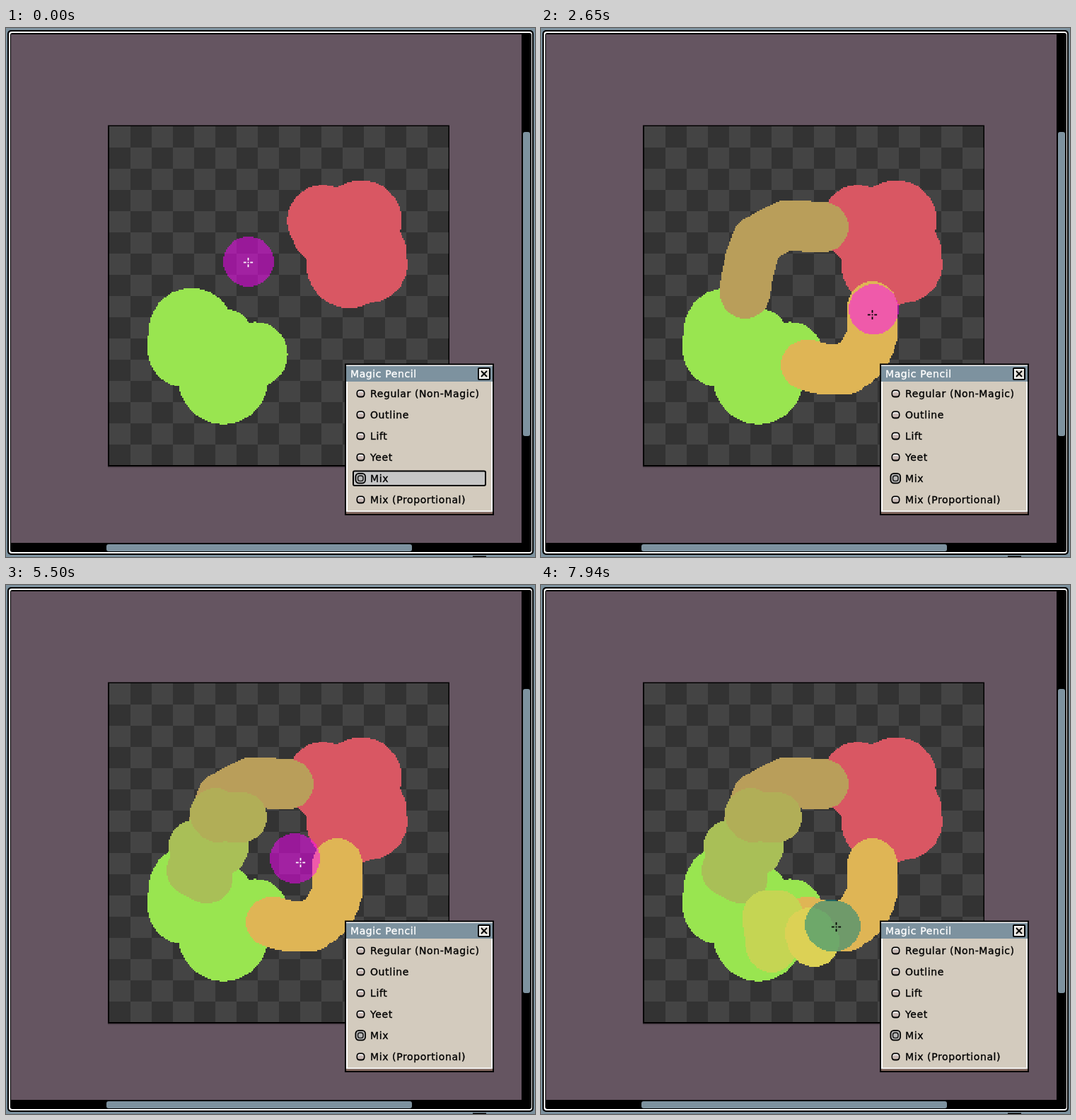
Recreate the animation shown at these times as an HTML page with a canvas. Size 748x748 px, loop 8000 ms.

```html
<!DOCTYPE html>
<html lang="en">
<head>
<meta charset="utf-8">
<title>Magic Pencil</title>
<style>
html, body { margin: 0; width: 100%; height: 100%; overflow: hidden; background: #655561; }
canvas { display: block; }
</style>
</head>
<body>
<canvas id="stage" width="748" height="748"></canvas>
<script>
const LOOP = 8000, PX = 1.875, LEFT = 146, TOP = 139, SPRITE = 256, BRUSH = 35.6, SETTLE = 45;
const STEEL = '#7d929f', PAPER = '#d3cbbe', MAGENTA = '#ff00ff', TEAL = '#008080';
const ctx = document.getElementById('stage').getContext('2d', { willReadFrequently: true });

// Brush centre over time: ms, x, y
const path = [
  [0, 342, 331], [140, 342, 331], [400, 390, 285], [560, 400, 282], [760, 347, 279],
  [830, 305, 301], [970, 296, 330], [1080, 290, 359], [1200, 288, 376], [1600, 345, 485],
  [1800, 374, 476], [1980, 400, 482], [2130, 432, 482], [2300, 457, 463], [2430, 468, 436],
  [2600, 468, 394], [2650, 470, 397], [2900, 450, 475], [3050, 390, 494], [3430, 268, 425],
  [3610, 258, 401], [3850, 285, 415], [4130, 266, 368], [4400, 306, 376], [4600, 309, 341],
  [4720, 292, 341], [4880, 296, 323], [5000, 300, 329], [5240, 334, 328], [5740, 478, 440],
  [5920, 443, 513], [5980, 426, 541], [6280, 331, 497], [6480, 331, 497], [6620, 326, 512],
  [6880, 320, 467], [6980, 336, 467], [7270, 380, 492], [7430, 386, 504], [7700, 408, 480],
  [7940, 416, 483], [8000, 419, 483]
];

// Button down, button up, mixed colour, preview tint
const strokes = [
  [560, 1200, '#b99e5a', MAGENTA],
  [1800, 2600, '#dfb555', MAGENTA],
  [3640, 4130, '#a9bf57', MAGENTA],
  [4330, 4600, '#a9bf57', MAGENTA],
  [4880, 5000, '#b1ae57', MAGENTA],
  [5140, 5240, '#b1ae57', MAGENTA],
  [6530, 6980, '#c5d553', MAGENTA],
  [7270, 7430, '#dcd155', MAGENTA],
  [7700, LOOP, '#6b9d6b', TEAL]
].map(([down, up, color, tint]) => ({ down, up, color, tint, commit: up + SETTLE }));

const redBlob = [[447, 273, 50], [453, 285, 50], [503, 272, 57], [518, 318, 49], [513, 334, 54], [485, 335, 60]];
const greenBlob = [[262, 427, 60], [252, 442, 52], [252, 455, 52], [307, 497, 63], [310, 438, 40], [352, 462, 46]];

function brushAt(t) {
  t = Math.min(t, LOOP);
  const i = Math.max(1, path.findIndex(k => k[0] >= t));
  const [t0, x0, y0] = path[i - 1], [t1, x1, y1] = path[i];
  const u = (t - t0) / (t1 - t0);
  return [x0 + (x1 - x0) * u, y0 + (y1 - y0) * u];
}

function makeLayer() {
  const c = document.createElement('canvas');
  c.width = c.height = SPRITE;
  return c.getContext('2d');
}

// Hard-edged disc on the sprite's own pixel grid
function disc(g, x, y, radius = BRUSH) {
  const cx = Math.round((x - LEFT) / PX), cy = Math.round((y - TOP) / PX), r = radius / PX;
  for (let dy = -Math.round(r); dy < Math.round(r); dy++) {
    const half = Math.round(Math.sqrt(Math.max(0, r * r - (dy + .5) ** 2)));
    g.fillRect(cx - half, cy + dy, half * 2, 1);
  }
}

function dabs(g, from, to) {
  for (let t = from; t < to; t += 6) disc(g, ...brushAt(t));
  disc(g, ...brushAt(to));
}

function showLayer(g, alpha = 1) {
  ctx.globalAlpha = alpha;
  ctx.drawImage(g.canvas, LEFT, TOP, SPRITE * PX, SPRITE * PX);
  ctx.globalAlpha = 1;
}

const base = makeLayer(), preview = makeLayer();
for (const [color, blob] of [['#d95763', redBlob], ['#99e550', greenBlob]]) {
  base.fillStyle = color;
  blob.forEach(d => disc(base, ...d));
}
for (const s of strokes) {
  s.layer = makeLayer();
  s.layer.fillStyle = s.color;
  dabs(s.layer, s.down, s.up);
}

function rect(color, x, y, w, h) {
  ctx.fillStyle = color;
  ctx.fillRect(x, y, w, h);
}

function round(color, x, y, w, h, r) {
  ctx.fillStyle = color;
  ctx.beginPath();
  ctx.roundRect(x, y, w, h, r);
  ctx.fill();
}

function label(text, x, y, color) {
  ctx.font = '14px "DejaVu Sans", sans-serif';
  ctx.letterSpacing = '0.6px';
  ctx.fillStyle = ctx.strokeStyle = color;
  ctx.lineWidth = .35;
  ctx.fillText(text, x, y);
  ctx.strokeText(text, x, y);
}

function drawFrame() {
  rect(STEEL, 0, 0, 748, 748);
  round('#000', 2, 3, 744, 742, 5);
  round('#fff', 4, 5, 740, 738, 4);
  round('#000', 6, 7, 737, 734, 3);
  rect('#655561', 7, 9, 722, 719);
  round(STEEL, 731, 147, 10, 430, 3);
  round(STEEL, 142, 730, 432, 10, 3);
  rect('#000', 660, 746.5, 19, 1.5);
  rect('#4c3f48', 144, 620, 483, 1.5);
  rect('#000', 144, 137.5, 483, 482.5);
  rect('#333', LEFT, TOP, 479.5, 479);
  ctx.fillStyle = '#444';
  for (let i = 0; i < 256; i++) {
    const col = i % 16, row = i >> 4;
    if ((col + row) % 2 === 0) {
      ctx.fillRect(LEFT + col * 30, TOP + row * 30, col < 15 ? 30 : 29.5, row < 15 ? 30 : 29);
    }
  }
}

function drawRadio(y, on) {
  if (on) {
    round('#000', 493.5, y - 8, 15.5, 15.5, 5.5);
    round('#b9b9b9', 495.3, y - 6.2, 12, 12, 4);
    round('#222', 496.8, y - 4.7, 9, 9, 3.5);
    round('#b9b9b9', 498.4, y - 3.1, 5.8, 5.8, 2);
  } else {
    round('#000', 495.5, y - 5.5, 12, 11, 4.5);
    round('#fff', 497.3, y - 3.7, 8.4, 6, 2.5);
    round('#c8b8b3', 497.3, y - 2, 8.4, 5.6, 2.5);
  }
}

function drawDialog(hover) {
  rect('#000', 479, 474.5, 211, 214.5);
  rect('#fff', 481, 476.5, 207, 208);
  rect('#86695f', 481, 684.5, 207, 2.5);
  rect(STEEL, 481, 478, 207, 22);
  rect(PAPER, 483, 500, 203, 182.5);
  label('Magic Pencil', 487, 494, '#fff');
  round('#000', 667, 480, 18, 18, 2);
  rect('#fff', 669, 482, 14, 14);
  rect('#e2ddd5', 670.5, 483.5, 12.5, 11);
  ctx.strokeStyle = '#000';
  ctx.lineWidth = 1.9;
  ctx.beginPath();
  for (const s of [-4, 4]) {
    ctx.moveTo(676 - s, 485);
    ctx.lineTo(676 + s, 493);
  }
  ctx.stroke();
  if (hover) {
    round('#000', 490, 625.5, 189, 22.5, 3);
    round('#c6c6c6', 492, 627.5, 185, 18.5, 1);
  }
  ['Regular (Non-Magic)', 'Outline', 'Lift', 'Yeet', 'Mix', 'Mix (Proportional)'].forEach((text, i) => {
    const y = 517 + i * 30;
    drawRadio(y, text === 'Mix');
    label(text, 515, y + 5, '#000');
  });
}

// Crosshair contrasts with whatever lies below it
function drawCursor(t) {
  const [x, y] = brushAt(t + 25).map(v => Math.round(v) + .5);
  const [r, g, b] = ctx.getImageData(Math.floor(x), Math.floor(y), 1, 1).data;
  const color = r * .3 + g * .59 + b * .11 > 100 ? '#000' : '#fff';
  rect(color, x - .9, y - .9, 1.8, 1.8);
  for (const a of [-6.6, 2.8]) {
    rect(color, x + a, y - .9, 3.8, 1.8);
    rect(color, x - .9, y + a, 1.8, 3.8);
  }
}

function draw(now) {
  const t = now % LOOP;
  ctx.imageSmoothingEnabled = false;
  drawFrame();
  showLayer(base);
  for (const s of strokes) if (t >= s.commit) showLayer(s.layer);

  const active = strokes.find(s => t >= s.down && t < s.commit);
  preview.clearRect(0, 0, SPRITE, SPRITE);
  preview.fillStyle = active ? active.tint : MAGENTA;
  if (active) dabs(preview, active.down, Math.min(t, active.up));
  disc(preview, ...brushAt(t));
  showLayer(preview, .5);

  drawCursor(t);
  drawDialog(t < 140);
}

const start = performance.now();
function tick() {
  draw(performance.now() - start);
  requestAnimationFrame(tick);
}
tick();
</script>
</body>
</html>
```
